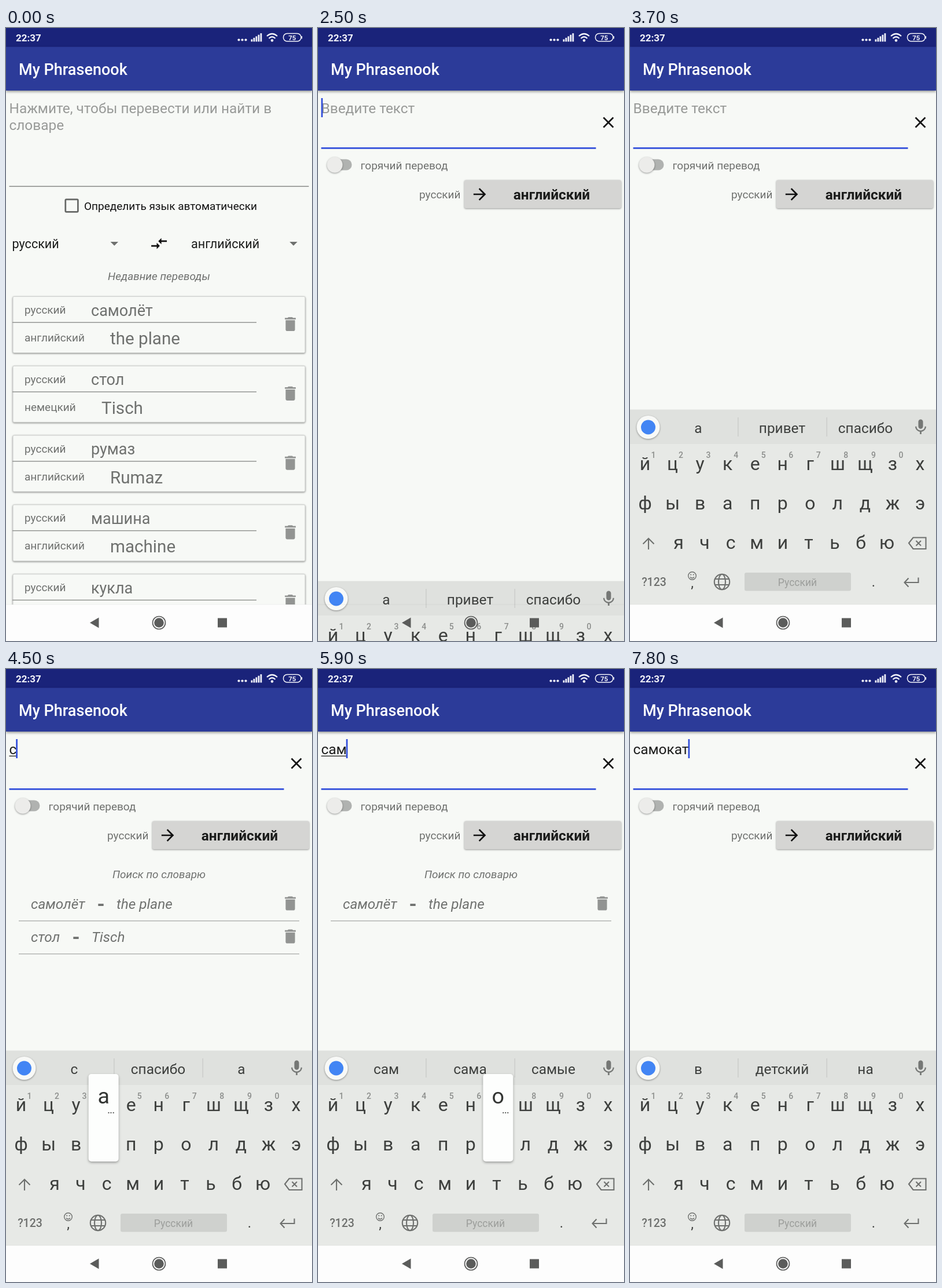
These frames come from a looping animation (529x1058 px, 8 s). An HTML page:

```html
<!DOCTYPE html>
<html lang="ru">
<head>
<meta charset="utf-8">
<title>Phrasenook</title>
<style>
html, body { margin: 0; width: 100%; height: 100%; overflow: hidden; background: #f7f9f6; }
svg { display: block; width: 100%; height: 100%; font-family: Roboto, sans-serif; }
text { white-space: pre; }
.mid { text-anchor: middle; }
.s14 { font-size: 19px; fill: #6f716f; }
.s16 { font-size: 21.6px; fill: #1b1c1b; }
.s18 { font-size: 24.4px; }
.s20 { font-size: 27px; fill: #6f716f; }
.s22 { font-size: 29.6px; fill: #6f716f; }
.it { font-style: italic; fill: #6f716f; }
.hint { fill: #989a98; }
.pressed .hint { fill: #737573; }
.edge { fill: #858785; }
.pressed .edge { fill: #304ddb; }
.dark { fill: #1b1c1b; }
.card { fill: #f7f9f6; stroke: #cfd1cf; filter: drop-shadow(0 1px 1.5px #0007); }
.bin { fill: #929492; }
.key { font-size: 32px; fill: #3d3f3d; text-anchor: middle; }
.digit { font-size: 14px; font-weight: 500; fill: #8b8d8b; text-anchor: middle; }
.icon { fill: none; stroke: #6e706e; stroke-width: 2.1; }
.lift { filter: drop-shadow(0 1px 1.5px #0006); }
</style>
</head>
<body>
<svg id="stage" viewBox="0 0 529 1058" preserveAspectRatio="none"></svg>
<script>
const DP = 1.347;
const glyphs = {
  bin: 'M6 19c0 1.1.9 2 2 2h8c1.1 0 2-.9 2-2V7H6v12zM19 4h-3.5l-1-1h-5l-1 1H5v2h14V4z',
  drop: 'M7 10l5 5 5-5z',
  swap: 'M9.01 14H2v2h7.01v3L13 15l-3.99-4v3zm5.98-1v-3H22V8h-7.01V5L11 9l3.99 4z',
  close: 'M19 6.41L17.59 5 12 10.59 6.41 5 5 6.41 10.59 12 5 17.59 6.41 19 12 13.41 17.59 19 19 17.59 13.41 12z',
  next: 'M12 4l-1.41 1.41L16.17 11H4v2h12.17l-5.58 5.59L12 20l8-8z',
  mic: 'M12 14c1.66 0 3-1.34 3-3V5c0-1.66-1.34-3-3-3S9 3.34 9 5v6c0 1.66 1.34 3 3 3zm5.3-3c0 3-2.54 5.1-5.3 5.1S6.7 14 6.7 11H5c0 3.41 2.72 6.23 6 6.72V21h2v-3.28c3.28-.48 6-3.3 6-6.72h-1.7z'
};

// Icon centred on x, y
const icon = (name, x, y, fill, cls = '') =>
  `<path class="${cls}" fill="${fill}" d="${glyphs[name]}" transform="translate(${x - 12 * DP} ${y - 12 * DP}) scale(${DP})"/>`;
const text = (x, y, cls, str, extra = '') => `<text x="${x}" y="${y}" class="${cls}" ${extra}>${str}</text>`;
const rect = (x, y, w, h, fill, extra = '') => `<rect x="${x}" y="${y}" width="${w}" height="${h}" fill="${fill}" ${extra}/>`;
const range = (n, fn) => Array.from({ length: n }, (_, i) => fn(i)).join('');

const cards = [
  ['самолёт', 'английский', 'the plane', 180],
  ['стол', 'немецкий', 'Tisch', 165],
  ['румаз', 'английский', 'Rumaz', 180],
  ['машина', 'английский', 'machine', 180],
  ['кукла', 'английский', 'doll', 180]
];
const card = ([word, lang, result, x], i) => `<g transform="translate(0 ${463.5 + i * 119.8})">
  <rect class="card" x="12" y="0" width="505" height="97" rx="2"/>
  ${text(32, 29.5, 's14', 'русский')}${text(147, 33, 's20', word)}
  ${rect(11, 44, 422, 1.4, '#8d8f8d')}
  ${text(32, 77.5, 's14', lang)}${text(x, 82.5, 's22', result)}
  ${icon('bin', 491.5, 47.5, '', 'bin')}</g>`;

const home = `<g id="home" clip-path="url(#page)">
  ${text(5.5, 147, 's18 hint', 'Нажмите, чтобы перевести или найти в')}
  ${text(5.5, 175.5, 's18 hint', 'словаре')}
  <rect id="edge" class="edge" x="5.5" y="272.6" width="518" height="1.5"/>
  <rect x="102.8" y="295.8" width="21.6" height="21.6" rx="1.6" fill="none" stroke="#666866" stroke-width="2.7"/>
  ${text(135, 314, 's14', 'Определить язык автоматически', 'style="fill:#111"')}
  ${text(10.5, 379.5, 's16', 'русский')}${icon('drop', 187.3, 371.8, '#6f716f')}
  ${icon('swap', 264.6, 372, '#111')}
  ${text(320, 379.5, 's16', 'английский')}${icon('drop', 497, 371.8, '#6f716f')}
  ${text(264.5, 435, 's14 it mid', 'Недавние переводы')}
  ${cards.map(card).join('')}</g>`;

const match = (y, word, dashX, result, x) => `
  ${text(43, y, 's18 it', word)}
  ${text(dashX, y + 3, 'mid', '-', 'font-size="34" font-weight="700" fill="#6f716f"')}
  ${text(x, y, 's18 it', result)}
  ${icon('bin', 491.5, y - 9.5, '', 'bin')}
  ${rect(22, y + 20, 485, 1.4, '#b0b2b0')}`;

const editor = `<g id="editor">
  <text id="hint" class="s18 hint" x="5.5" y="147">Введите текст</text>
  <text id="typed" class="s18 dark" x="5.5" y="147"></text>
  <rect id="under" x="5.5" y="149.6" height="1.3" fill="#1b1c1b"/>
  <rect id="caret" y="121" width="2.7" height="33" fill="#304ddb"/>
  ${rect(5.5, 206, 475, 2.7, '#304ddb')}
  ${icon('close', 502, 163, '#111')}
  ${rect(20, 226.5, 38.5, 19, '#b0b2b0', 'rx="9.5"')}
  <circle class="lift" cx="29" cy="236.3" r="13.5" fill="#ececea"/>
  ${text(73.5, 243.5, 's14', 'горячий перевод')}
  ${text(175, 294, 's14', 'русский')}
  ${rect(253, 262.5, 271, 48.5, '#d5d5d3', 'rx="2.7" class="lift"')}
  ${icon('next', 279.6, 287, '#111')}
  ${text(404, 295.7, 's18 dark mid', 'английский', 'font-weight="700"')}
  <g id="found">${text(264.5, 361, 's14 it mid', 'Поиск по словарю')}
  ${match(414, 'самолёт', 164, 'the plane', 191)}</g>
  <g id="found2">${match(471, 'стол', 121, 'Tisch', 148)}</g></g>`;

const rows = [
  { keys: 'йцукенгшщзх', x: 26, step: 47.55, y: 763 },
  { keys: 'фывапролджэ', x: 26, step: 47.55, y: 831 },
  { keys: 'ячсмитьбю', x: 84, step: 45, y: 898.5 }
];
const slots = [118, 263, 407];
const keyboard = `<g id="keyboard">
  ${rect(0, 658, 529, 1.5, '#eceeeb')}${rect(0, 659, 529, 59, '#dfe1de')}
  ${rect(0, 718, 529, 277, '#e7e9e6')}${rect(0, 995, 529, 400, '#fdfdfd')}
  ${rect(188, 659, 152, 59, '#cfd1ce', 'id="press"')}
  <circle class="lift" cx="31.5" cy="689" r="20" fill="#f8f9f7"/><circle cx="31.5" cy="689" r="12.5" fill="#4285f4"/>
  ${rect(186.3, 672, 1.2, 33, '#c6c8c5')}${rect(339.6, 672, 1.2, 33, '#c6c8c5')}
  ${slots.map(x => text(x, 698.5, 's18 mid slot', '', 'fill="#3d3f3d"')).join('')}
  ${icon('mic', 502.5, 689, '#757775')}
  ${rows.map(r => range(r.keys.length, i => text(r.x + r.step * i, r.y, 'key', r.keys[i]))).join('')}
  ${range(10, i => text(40.5 + 47.55 * i, 742, 'digit', (i + 1) % 10))}
  <g class="icon">
    <path d="M32 900V881M22.5 890.500L32 881L41.500 890.500"/>
    <path d="M482 889L489.500 879.500H511.500V899H489.500ZM494.500 885L503 893.500M503 885L494.500 893.500"/>
    <path d="M498.500 948.500V957H474.500M481.500 949.500L474.500 957L481.500 964.500"/>
    <circle cx="159" cy="956" r="13.2"/><ellipse cx="159" cy="956" rx="6" ry="13.2"/>
    <path d="M147 951H171M147 961H171"/>
    <g stroke-width="1.4"><circle cx="107.500" cy="945.500" r="6.800"/><path d="M104 947.500Q107.500 951.500 111 947.500"/></g>
  </g>
  <circle cx="105.200" cy="943.500" r="1.100" fill="#6e706e"/><circle cx="109.800" cy="943.500" r="1.100" fill="#6e706e"/>
  ${text(41.5, 963, 'mid', '?123', 'font-size="19.500" font-weight="500" fill="#6e706e"')}
  ${text(107.500, 966, 'mid', ',', 'font-size="24" fill="#3d3f3d"')}
  ${rect(198, 940, 184, 31.500, '#cfd1ce', 'rx="3"')}
  ${text(289.500, 963, 'mid', 'Русский', 'font-size="17.500" fill="#9c9e9b"')}
  ${text(421, 964, 'mid', '.', 'font-size="24" fill="#3d3f3d"')}
  <g id="popup"><rect x="-26" y="-132" width="52" height="151" rx="5" fill="#fdfefd" style="filter:drop-shadow(0 2px 2px #0005)"/>
    <text id="letter" class="mid" y="-81" font-size="37.700" fill="#333533"></text>
    <text id="more" class="mid" x="13" y="-64" font-size="14" font-weight="700" fill="#555755">...</text></g></g>`;

const chrome = `
  ${rect(0, 0, 529, 33, '#1a237a')}
  ${rect(0, 32.500, 529, 75.500, '#2c3b99', 'style="filter:drop-shadow(0 2px 2px #0006)"')}
  ${text(17, 22.500, '', '22:37', 'font-size="17" font-weight="700" fill="#f2f3fa"')}
  ${text(22, 81, '', 'My Phrasenook', 'font-size="27" font-weight="500" fill="#fff"')}
  <g fill="#f2f3fa">
    ${range(3, i => `<circle cx="${402.500 + i * 6}" cy="20.500" r="2.100"/>`)}
    ${range(5, i => rect(423.500 + i * 4, 19.500 - i * 2.600, 2.800, 4 + i * 2.600, '#f2f3fa'))}
    <circle cx="460" cy="21.500" r="2.300"/></g>
  <g fill="none" stroke="#f2f3fa" stroke-width="2.200"><path d="M451 14Q460 6 469 14M454.500 18Q460 12.500 465.500 18"/>
    <rect x="479.500" y="9.500" width="30.500" height="13.500" rx="6.500" stroke-width="1.500"/></g>
  ${rect(510.500, 14, 1.600, 4.500, '#f2f3fa')}
  ${text(494.800, 20.500, 'mid', '75', 'font-size="11.500" font-weight="700" fill="#f2f3fa"')}`;

const nav = `${rect(0, 994.500, 529, 1, '#000', 'opacity=".05"')}
  <g fill="#5b5c5b"><path d="M145 1026.500L160.500 1017.500V1035.500Z"/><circle cx="264.500" cy="1026.500" r="8.300"/>
  ${rect(366, 1018.500, 16, 16, '#5b5c5b')}</g>
  <circle cx="264.500" cy="1026.500" r="11" fill="none" stroke="#5b5c5b" stroke-width="1.700"/>`;

const stage = document.getElementById('stage');
stage.innerHTML = `<clipPath id="page"><rect width="529" height="995"/></clipPath>
  ${rect(0, 0, 529, 1058, '#f7f9f6')}${home}${editor}${rect(0, 995, 529, 63, '#fdfdfd')}${keyboard}${chrome}${nav}`;

const $ = id => document.getElementById(id);
const slotEls = [...document.querySelectorAll('.slot')];

// Each entry changes part of the state from its time on
const script = [
  [0, { typed: '', found: 0, key: '', words: 'а привет спасибо', edit: 2200 }],
  [2100, { pressed: true }],
  [3900, { key: 'с' }], [4000, { key: '' }],
  [4200, { typed: 'с', edit: 4200, found: 2, words: 'с спасибо а' }],
  [4500, { key: 'а' }], [4600, { key: '' }],
  [4700, { typed: 'са', edit: 4700, found: 1, words: 'са сам сайт' }],
  [5600, { key: 'м' }], [5700, { key: '' }],
  [5800, { typed: 'сам', edit: 5800, words: 'сам сама самые' }],
  [5900, { key: 'о' }],
  [6100, { key: '', typed: 'само', edit: 6100, words: 'само самолёт самое' }],
  [6400, { key: 'к' }], [6500, { key: '' }],
  [6600, { key: 'а', typed: 'самок', edit: 6600, found: 0, words: 'самок самокат самоката' }],
  [6800, { key: '', typed: 'самока', edit: 6800 }],
  [6900, { words: 'самока самокат самокаты' }],
  [7600, { press: true }],
  [7700, { press: false, typed: 'самокат', edit: 7700, done: true }],
  [7800, { words: 'в детский на' }]
];

const show = (el, on) => el.setAttribute('visibility', on ? 'visible' : 'hidden');

function render(t) {
  const s = Object.assign({}, ...script.filter(e => e[0] <= t).map(e => e[1]));
  const fade = Math.min(1, Math.max(0, (t - 2100) / 200));
  $('home').setAttribute('opacity', 1 - fade);
  $('editor').setAttribute('opacity', fade);
  $('home').classList.toggle('pressed', !!s.pressed);
  $('edge').setAttribute('height', s.pressed ? 2.7 : 1.5);

  $('typed').textContent = s.typed;
  const width = s.typed ? $('typed').getComputedTextLength() : 0;
  show($('hint'), !s.typed);
  $('under').setAttribute('width', s.done ? 0 : width);
  $('caret').setAttribute('x', 5.5 + Math.max(0, width - 1));
  show($('caret'), Math.floor((t - s.edit) / 500) % 2 === 0);
  show($('found'), s.found > 0);
  show($('found2'), s.found > 1);

  const left = Math.min(1, Math.max(0, 1 - (t - 2500) / 300));
  show($('keyboard'), t >= 2500);
  $('keyboard').setAttribute('transform', `translate(0 ${296 * left * left})`);
  s.words.split(' ').forEach((word, i) => { slotEls[i].textContent = word; });
  $('press').setAttribute('opacity', s.press ? 1 : 0);

  $('popup').setAttribute('display', s.key ? 'inline' : 'none');
  if (s.key) {
    const row = rows.find(r => r.keys.includes(s.key));
    $('popup').setAttribute('transform', `translate(${row.x + row.step * row.keys.indexOf(s.key)} ${row.y})`);
    $('letter').textContent = s.key;
    $('more').setAttribute('display', 'аок'.includes(s.key) ? 'inline' : 'none');
  }
}

const start = performance.now();
let last = -1;
function tick() {
  const t = Math.floor((performance.now() - start) % 8000 / 100) * 100;
  if (t !== last) render(last = t);
  requestAnimationFrame(tick);
}
tick();
</script>
</body>
</html>
```
